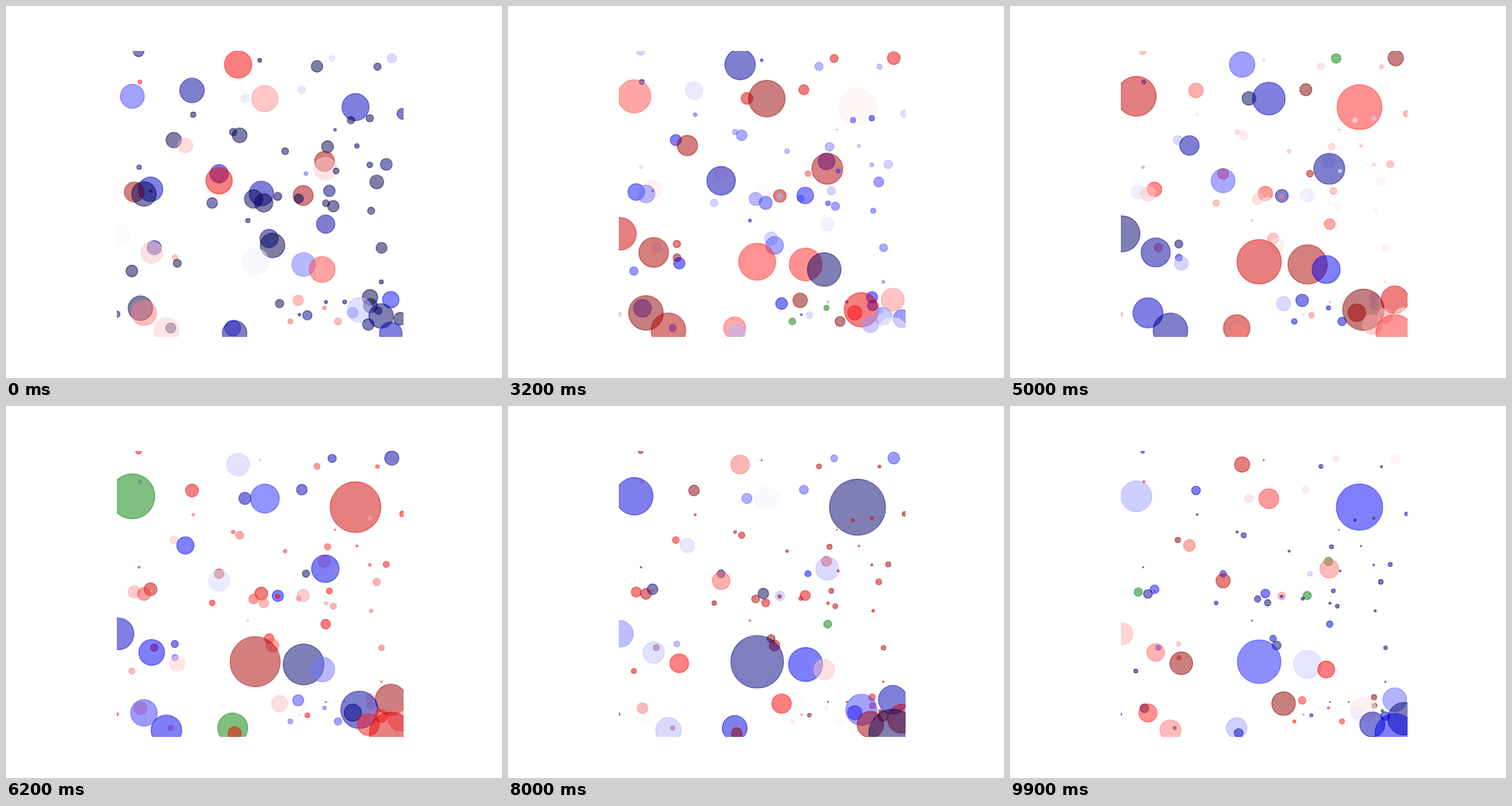
An HTML page with a canvas for the animation above (10000 ms loop, 640 by 480 pixels).

```html
<!DOCTYPE html>
<html lang="en">
<head>
<meta charset="utf-8">
<title>Bubbles</title>
<style>
html, body { margin: 0; width: 100%; height: 100%; overflow: hidden; background: #fff; }
canvas { display: block; width: 640px; height: 480px; }
</style>
</head>
<body>
<canvas id="stage" width="640" height="480"></canvas>
<script>
const ctx = document.getElementById("stage").getContext("2d");
const BOX = { x: 143, y: 58, w: 370, h: 369 };
const STEP = 0.1, LOOP = 10, CYCLE = 9.1, GROWTH = 0.1;

// x, y, radius, time of the peak, optional colour rate before it
const bursts = [
  [299.5, 75.5, 18, 2.15], [163, 116.5, 15.8, 6.2], [334, 119.5, 17.4, 3.55],
  [231.5, 180, 9.8, 3.9], [451, 130.5, 17.8, 7.6], [412, 210, 14.8, 4.1],
  [275, 225.5, 17.4, 2], [188, 318, 14.2, 4], [144.5, 294, 15.5, 4.6],
  [321.5, 330, 17.6, 7.35, 0.07], [384, 333.5, 15.6, 5.8], [408, 340, 17, 2.9],
  [221, 332, 5.6, 10.3], [353, 384, 5.8, 10.2], [178, 396, 16.5, 3.4],
  [207, 418.5, 16.5, 4.1], [292.5, 415.5, 10.6, 6.2], [496.5, 379, 11, 6.7],
  [467.5, 411, 7.8, 8.7], [496.5, 422.5, 15, 7.7], [456, 392, 16.4, 5.1],
  [508.5, 403.5, 8.6, 9.5]
];

// x, y: these share a radius, in the order their colours run
const embers = [[383.5, 244.5], [411, 200.5], [165.5, 240]];
const large = [
  [186.5, 236.5], [329.5, 242], [240, 109], [295, 422],
  [484, 400], [178, 242.5], [344, 309], [173.5, 390]
];
const medium = [[275, 216.5], [412.5, 281.5], [339.5, 300], [319.5, 249], [332.5, 254]];

let seed = 7;
function random(low, high) {
  seed = (seed * 16807) % 2147483647;
  return low + (high - low) * seed / 2147483647;
}

const place = () => [random(BOX.x, BOX.x + BOX.w), random(BOX.y, BOX.y + BOX.h)];

const shrink = (x, y, r, start) => ({ x, y, r, peak: 0, start });

const grow = (x, y, r, peak, rate = 1 / CYCLE) =>
  ({ x, y, r, peak, rate, start: peak });

const bubbles = [
  ...Array.from({ length: 42 }, () => shrink(...place(), random(2, 10.5), random(-1.1, 1.1))),
  ...Array.from({ length: 14 }, () => grow(...place(), random(2.5, 7.5), random(2.5, 7))),
  ...large.map(([x, y], i) => shrink(x, y, 16.2, 0.3 * i - 1.6)),
  ...medium.map(([x, y], i) => shrink(x, y, 12.2, 0.5 * i - 1.6)),
  ...embers.map(([x, y]) => grow(x, y, 13.2, 0.75)),
  ...bursts.map(b => grow(...b))
].sort((a, b) => a.y - b.y);

// navy, blue, white, red, maroon
function shade(c) {
  const unit = v => Math.min(Math.max(v, 0), 1);
  c = unit(c);
  const red = c < 0.75 ? unit(4 * c - 1) : 2.5 - 2 * c;
  const green = unit(1 - Math.abs(4 * c - 2));
  const blue = c < 0.25 ? 0.3 + 2.8 * c : unit(3 - 4 * c);
  return `rgba(${[red, green, blue].map(v => Math.round(255 * v))},0.5)`;
}

function colour(b, t) {
  const age = t - b.start + 1e-6;
  if (age < 0) return shade(b.rate ? 1 + age * b.rate : 0);
  const flash = age % CYCLE < STEP && (b.rate || age >= CYCLE);
  return flash ? "rgba(0,128,0,0.5)" : shade(age / CYCLE % 1);
}

function bubble(b, t) {
  const r = b.r * Math.exp(GROWTH * (b.peak - Math.abs(t - b.peak)));
  ctx.fillStyle = ctx.strokeStyle = colour(b, t);
  ctx.beginPath();
  ctx.arc(b.x, b.y, Math.max(r - 0.4, 0.5), 0, Math.PI * 2);
  ctx.fill();
  ctx.stroke();
}

function draw(now) {
  const t = Math.floor(now / 100) % (LOOP / STEP) * STEP;
  ctx.fillStyle = "#fff";
  ctx.fillRect(0, 0, 640, 480);
  ctx.save();
  ctx.beginPath();
  ctx.rect(BOX.x, BOX.y, BOX.w, BOX.h);
  ctx.clip();
  ctx.lineWidth = 1.2;
  bubbles.forEach(b => bubble(b, t));
  ctx.restore();
}

const begin = performance.now();
function tick() {
  draw(performance.now() - begin);
  requestAnimationFrame(tick);
}
tick();
</script>
</body>
</html>
```
